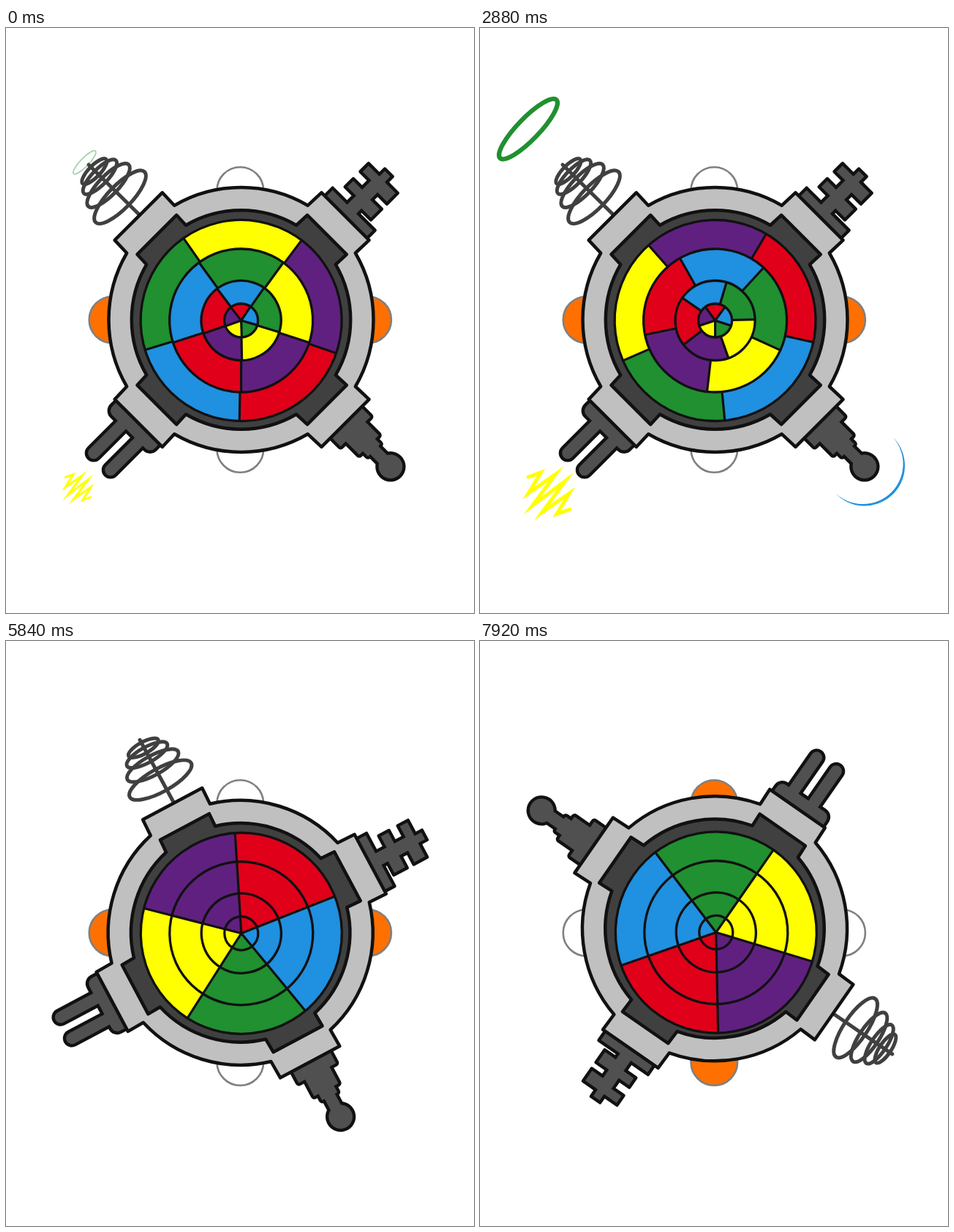
Write an HTML page with a canvas that moves like this. It is 640x800 px and loops after 8000 ms.

```html
<!DOCTYPE html>
<html lang="en">
<head>
<meta charset="utf-8">
<title>Gadget wheel</title>
<style>
html, body { margin: 0; width: 100%; height: 100%; overflow: hidden; background: #fff; }
canvas { display: block; width: 640px; height: 800px; }
</style>
</head>
<body>
<canvas id="stage" width="640" height="800"></canvas>
<script>
const ctx = document.getElementById('stage').getContext('2d');
const LOOP = 8000, RAD = Math.PI / 180, TAU = Math.PI * 2;
const INK = '#111', STEEL = '#c0c0c0', DARK = '#404040', TOOL = '#505050';
const ORANGE = '#ff7000', RED = '#e0001a', BLUE = '#2090e0', GREEN = '#209030', YELLOW = '#ffff00', PURPLE = '#602080';
const SECTORS = [RED, BLUE, GREEN, YELLOW, PURPLE];
const RADII = [23, 54.5, 98, 137.5];
const PIVOT = { x: 321.5, y: 396.1 }, HUB = { x: 321.5, y: 399 };
const EFFECTS_END = 4840;
const SPIN = 0.02725;

const clamp = x => Math.min(1, Math.max(0, x));
const ease = x => (1 - Math.cos(Math.PI * clamp(x))) / 2;
const blink = (t, half) => Math.floor((t + 20) / half) % 2 === 1;

// Quarter turn with wind-up and overshoot, x in ms from its middle
function quarterTurn(x) {
  let start = -1520, angle = 0;
  for (const [size, len] of [[-18, 600], [51, 720], [-156, 400], [51, 510], [-18, 600]]) {
    angle += size * ease((x - start) / len);
    start += len;
  }
  return angle;
}

const bodyTurn = t => [0, 1, 2].reduce((sum, k) => sum + quarterTurn(t - 6314 - 1510 * k), 0);
const discSteps = t => [0, 1, 2].reduce((sum, k) => sum + ease((t - 5700 - 860 * k) / 300), 0);

// Rings turn in alternate directions, then lock one by one from the inside
function ringAngle(k, t) {
  const lock = 2050 + 683 * k, dir = k % 2 ? -1 : 1;
  const angle = -2 - 71 * k + dir * SPIN * Math.min(t, lock);
  return t < lock ? angle : (angle - 360 * Math.round(angle / 360)) * (1 - ease((t - lock) / 350));
}

function paint(fill, stroke, width) {
  if (fill) { ctx.fillStyle = fill; ctx.fill(); }
  if (stroke) { ctx.strokeStyle = stroke; ctx.lineWidth = width; ctx.stroke(); }
}

function trace(pts) {
  ctx.beginPath();
  pts.forEach(([x, y]) => ctx.lineTo(x, y));
}

function oval(x, y, a, b = a, angle = 0) {
  ctx.beginPath();
  ctx.ellipse(x, y, a, b, angle * RAD, 0, TAU);
}

function bulbs(t) {
  const upright = blink(t, 720);
  for (let k = 0; k < 4; k++) {
    const flat = k % 2 === 0, a = k * 90 * RAD, d = flat ? 174.8 : 177;
    oval(320.3 + d * Math.cos(a), 399 + d * Math.sin(a), 31.8);
    paint(flat !== upright ? ORANGE : '#fff', '#808080', 2.6);
  }
}

// Circle with four square lugs on the diagonals
function lugged(r, reach, half, fill) {
  const da = Math.asin(half / r), shift = 1.1;
  ctx.beginPath();
  for (let k = 0; k < 4; k++) {
    const a = (45 + 90 * k) * RAD, c = Math.cos(a), s = Math.sin(a);
    for (const v of [-half, half]) ctx.lineTo(HUB.x + shift + reach * c - v * s, HUB.y + reach * s + v * c);
    ctx.arc(HUB.x, HUB.y, r, a + da, a + Math.PI / 2 - da);
  }
  ctx.closePath();
  paint(fill, INK, 4.5);
}

// Outlined union of bars pointing away from the hub: [from, to, low, high, corner]
function tool(angle, bars) {
  ctx.save();
  ctx.translate(HUB.x, HUB.y);
  ctx.rotate(angle * RAD);
  [[INK, 2.2], [TOOL, -2.2]].forEach(([color, grow]) => {
    bars.forEach(([u0, u1, v0, v1, corner = 2.5]) => {
      const r = Math.max(0.3, corner + grow);
      ctx.beginPath();
      ctx.roundRect(u0 - grow, v0 - grow, u1 - u0 + 2 * grow, v1 - v0 + 2 * grow, r);
      paint(color);
    });
  });
  ctx.restore();
}

function key() {
  const bars = [[190, 216, -39, 43, 0], [190, 274, -11, 11, 0], [240, 285, -7, 8, 0]];
  for (let i = 0; i < 2; i++) {
    bars.push([229 + 29.5 * i, 245 + 29.5 * i, -28, 8, 0], [222 + 31 * i, 243 + 31 * i, -8, 29, 0]);
  }
  tool(-45, bars);
}

function probe() {
  const tiers = [[221, 31], [247, 21], [257, 14], [280, 10]];
  const bars = tiers.map(([end, half]) => [190, end, -2.5 - half, -2.5 + half, 3]);
  tool(45, [...bars, [268, 305, -21, 16, 18.5]]);
}

function plug() {
  const prongs = [-19, 13.6].map(v => [200, 281.5, v - 10, v + 10, 10]);
  tool(135, [[190, 219, -43, 43, 11], ...prongs]);
}

function whisk() {
  trace([[113, 187], [185, 258]]);
  paint(null, DARK, 5);
  for (let i = 0; i < 4; i++) {
    const x = 156 - 18 * i + 2.1 * i * i;
    oval(x, x + 75.2, 48 - 8.3 * i, 16 - 2.7 * i, -46);
    paint(null, DARK, 5);
  }
}

function body(t) {
  ctx.save();
  ctx.translate(PIVOT.x, PIVOT.y);
  ctx.rotate(bodyTurn(t) * RAD);
  ctx.translate(-PIVOT.x, -PIVOT.y);
  whisk();
  key();
  probe();
  plug();
  lugged(181, 200, 46, STEEL);
  lugged(149.7, 164.5, 38, DARK);
  ctx.restore();
}

function disc(t) {
  const steps = discSteps(t);
  ctx.save();
  ctx.translate(321.6 + 0.4 * steps, 400 - 0.5 * steps);
  for (let k = RADII.length - 1; k >= 0; k--) {
    const r = RADII[k];
    ctx.save();
    ctx.rotate((ringAngle(k, t) + 71.6 * steps) * RAD);
    SECTORS.forEach((color, i) => {
      const a = (72 * i - 126) * RAD;
      ctx.beginPath();
      ctx.moveTo(0, 0);
      ctx.arc(0, 0, r, a, a + 72 * RAD);
      paint(color);
    });
    SECTORS.forEach((_, i) => {
      const a = (72 * i - 126) * RAD;
      trace([[0, 0], [r * Math.cos(a), r * Math.sin(a)]]);
      paint(null, INK, 3.2);
    });
    oval(0, 0, r);
    paint(null, INK, 3.3);
    ctx.restore();
  }
  ctx.restore();
}

function wave(t) {
  const age = (t + 40) % 1800, p = clamp(age / 1160);
  const size = 15 + 27 * p;
  ctx.save();
  ctx.globalAlpha = age < 1160 ? Math.min(1, 0.42 + age / 1500) : clamp((1800 - age) / 640);
  oval(109 - 44.5 * p, 185.5 - 49 * p, size * 1.35, size * 0.36, -46);
  paint(null, GREEN, 1.4 + 5 * p);
  ctx.restore();
}

// Zigzag across a diagonal, widest in the middle
function spark(t) {
  const scale = blink(t, 400) ? 1 : 0.613, pts = [];
  for (let i = 0; i < 10; i++) {
    const along = 1 + 5.6 * i;
    const across = (i % 2 ? 1 : -1) * (3 + 17 * Math.sin(Math.PI * i / 9)) - 4;
    pts.push([72 + along + across, 606 + along - across]);
  }
  ctx.save();
  ctx.translate(105.3, 615);
  ctx.scale(scale, scale);
  ctx.translate(-105.3, -615);
  ctx.lineJoin = 'miter';
  ctx.miterLimit = 20;
  trace(pts);
  paint(null, YELLOW, 5);
  ctx.restore();
}

function rays() {
  for (let i = 0; i < 5; i++) {
    ctx.save();
    ctx.translate(531, 193);
    ctx.rotate((36 * i - 117) * RAD);
    trace([[0, -2.6], [74, 0], [0, 2.6]]);
    paint(RED);
    ctx.restore();
  }
}

function crescent() {
  ctx.beginPath();
  ctx.arc(526, 598.5, 55, -42 * RAD, 138 * RAD);
  ctx.arc(523.6, 596.1, 55, 136 * RAD, -40 * RAD, true);
  paint(BLUE);
}

function draw(t) {
  ctx.fillStyle = '#fff';
  ctx.fillRect(0, 0, 640, 800);
  ctx.lineJoin = ctx.lineCap = 'round';
  bulbs(t);
  body(t);
  disc(t);
  if (t < EFFECTS_END) {
    wave(t);
    spark(t);
    if (blink(t, 600)) rays();
    if (blink(t, 500)) crescent();
  }
}

const begin = performance.now();
function tick() {
  draw((performance.now() - begin) % LOOP);
  requestAnimationFrame(tick);
}
tick();
</script>
</body>
</html>
```
